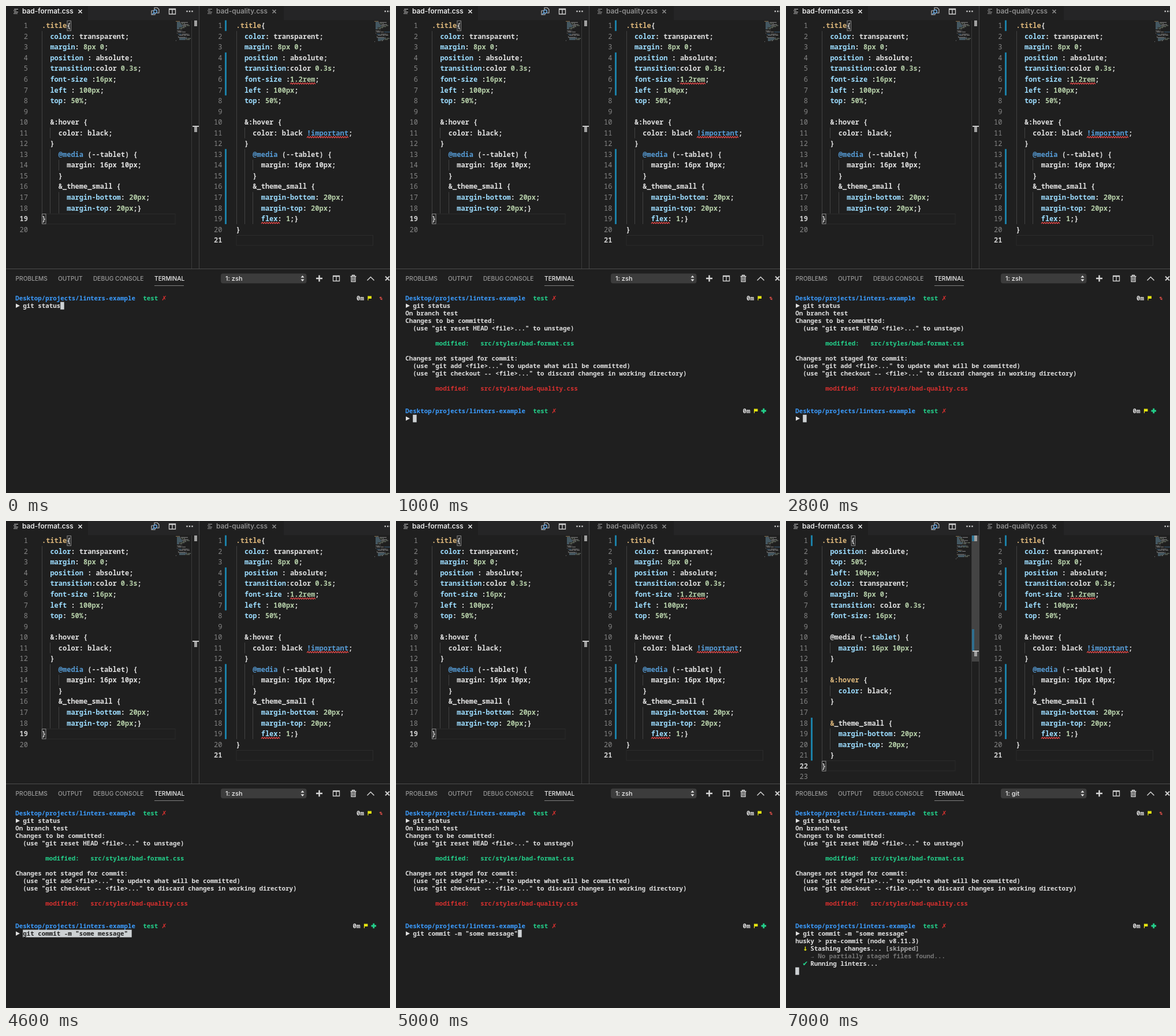
These frames come from a looping animation (665 px wide and 842 px high, 8 s). An HTML page:

```html
<!DOCTYPE html>
<html lang="en">
<head>
<meta charset="utf-8">
<title>Linters in the editor</title>
<style>
  html, body { margin: 0; width: 100%; height: 100%; overflow: hidden; background: #1f1f1f; }
  svg { display: block; }
  text { white-space: pre; }
  .code { font: 600 12px "Noto Sans Mono", "DejaVu Sans Mono", monospace; }
  .term { font: 600 10.83px "Noto Sans Mono", "DejaVu Sans Mono", monospace; }
  .num { font-weight: 500; }
  .bold { font-weight: 700; }
  .sign { font: 700 13.5px "DejaVu Sans Mono", "DejaVu Sans", monospace; }
  .ui { font-family: Inter, Roboto, sans-serif; font-weight: 500; }
</style>
</head>
<body>
<svg id="stage" width="665" height="842" viewBox="0 0 665 842"></svg>
<script>
const LOOP = 8000;
const COLORS = {
  w: '#e0e0e0', y: '#dcb67a', b: '#9cdcfe', g: '#b5cea8', k: '#569cd6',
  d: '#747474', r: '#d6302f', n: '#23d18b', p: '#3b9cff', u: '#e5e510', l: '#a8a8a8'
};

// Code: "~x" switches to colour x; declarations are highlighted automatically.
const head = ['  color: transparent;', '  margin: 8px 0;', '  position : absolute;', '  transition:color 0.3s;'];
const mid = ['  left : 100px;', '  top: 50%;', '', '~w  &:hover {'];
const nested = ['~w  }', '~k    @media ~w(--tablet) {', '~w      margin: 16px 10px;', '~w    }',
  '~w    &_theme_small {', '      margin-bottom: 20px;'];
const messy = ['~y.title~w{', ...head, '  font-size :16px;', ...mid, '~w    color: black;',
  ...nested, '      margin-top: 20px;}', '~w}', ''];
const quality = ['~y.title~w{', ...head, '  font-size :1.2rem;', ...mid, '~w    color: black ~k!important~w;',
  ...nested, '      margin-top: 20px;', '      flex: 1;}', '~w}', ''];
const tidy = ['~y.title ~w{', '  position: absolute;', '  top: 50%;', '  left: 100px;', '  color: transparent;',
  '  margin: 8px 0;', '  transition: color 0.3s;', '  font-size: 16px;', '', '~w  @media (--~btablet~w) {',
  '    margin: 16px 10px;', '~w  }', '', '~y  &:hover ~w{', '    color: black;', '~w  }', '',
  '~y  &~w_theme_small {', '    margin-bottom: 20px;', '    margin-top: 20px;', '~w  }', '~w}', ''];

const esc = s => s.replace(/&/g, '&amp;').replace(/</g, '&lt;');
const rect = (x, y, w, h, fill, more = '') =>
  `<rect x="${x}" y="${y}" width="${w}" height="${h}" fill="${fill}" ${more}/>`;
const path = (d, color, width = 1, fill = 'none') =>
  `<path d="${d}" stroke="${color}" stroke-width="${width}" fill="${fill}"/>`;
const label = (x, y, s, size, color) =>
  `<text class="ui" x="${x}" y="${y}" font-size="${size}" fill="${color}">${esc(s)}</text>`;
const during = (from, to, body) => `<g data-from="${from}" data-to="${to}">${body}</g>`;

function tokens(line) {
  const decl = /^( *[\w-]+)( ?:)(.*)$/.exec(line);
  if (!line.includes('~') && decl) {
    line = `~b${decl[1]}~w${decl[2]}` + decl[3].replace(/[\d.]+(px|rem|s|%)?/g, '~g$&~w');
  }
  let col = 0;
  return line.split('~').slice(1).map(part => {
    const token = { color: COLORS[part[0]], col, s: part.slice(1) };
    col += token.s.length;
    return token;
  });
}

function textLine(line, x, y, cell, cls) {
  return tokens(line).map(t => {
    const pad = t.s.length - t.s.trimStart().length, s = t.s.trim();
    const style = /^[✗↓❯✔]$/.test(s) ? 'sign' : cls;
    return `<text class="${style}" x="${x + (t.col + pad) * cell}" y="${y}" fill="${t.color}">${esc(s)}</text>`;
  }).join('');
}

// Editor
const CELL = 7.2, ROW = 18.55;
const rowTop = n => 24.7 + (n - 1) * ROW;

function minimap(lines, x) {
  return lines.map((line, i) => tokens(line).map(t =>
    [...t.s.matchAll(/[^\s]+/g)].map(m =>
      rect(x + t.col + m.index, 26 + i * 1.85, m[0].length, 1, t.color, 'opacity=".55"')
    ).join('')).join('')).join('');
}

function squiggle(x, row, chars) {
  let d = `M${x} ${rowTop(row) + 17.8}`;
  for (let i = 0; i < chars * CELL / 4; i++) d += 'l2 -2.500l2 2.500';
  return path(d, '#f14c4c', 1.2);
}

// guides: [column, first row, last row]; changed: [first row, last row]
function editor(x, lines, { current, width, guides, changed, mapX }) {
  let out = rect(x + .5, Math.round(rowTop(current)) + .5, width, 17.5, 'none', 'stroke="#2b2b2b"');
  for (const [col, a, b] of guides) {
    out += rect(Math.round(x + col * CELL), rowTop(a), 1, (b - a + 1) * ROW, '#424242');
  }
  for (const [a, b] of changed) out += rect(Math.round(x - 19.5), rowTop(a), 3, (b - a + 1) * ROW, '#1b81a8');
  lines.forEach((line, i) => {
    const y = 38.2 + i * ROW, on = i + 1 === current;
    out += `<text class="code ${on ? 'bold' : 'num'}" x="${x - 24}" y="${y}" text-anchor="end" fill="${on ? '#d0d0d0' : '#858585'}">${i + 1}</text>`;
    out += textLine(line, x, y, CELL, 'code');
  });
  return out + minimap(lines, mapX);
}

const bracket = (x, row) =>
  rect(x + .5, rowTop(row) + 1, 6.5, 17, 'none', 'stroke="#909090"');

const looseGuides = last => [[0, 2, last], [2, 11, 11], [2, 13, last], [4, 14, 14], [4, 17, last]];
const leftMessy = editor(62, messy, {
  current: 19, width: 230.5, guides: looseGuides(18), changed: [], mapX: 294
}) + bracket(105.5, 1) + bracket(62, 19)
  + rect(326, 25, 5, 10, '#a0a0a0') + rect(323, 207, 11, 2, '#c8c8c8') + rect(326, 209, 5, 9, '#a0a0a0');

const leftTidy = rect(322, 25, 13, 218, '#444444')
  + editor(62, tidy, {
    current: 22, width: 230.5, guides: [[0, 2, 21], [2, 11, 11], [2, 15, 15], [2, 19, 20]],
    changed: [[1, 1], [18, 21]], mapX: 294
  }) + bracket(112.7, 1) + bracket(62, 22)
  + rect(322, 25, 4, 10, '#2f7797') + rect(322, 187, 4, 37, '#2f6f90') + rect(326, 25, 5, 10, '#a0a0a0')
  + rect(323, 224, 11, 2, '#c8c8c8') + rect(326, 226, 5, 8, '#a0a0a0');

const right = editor(398.5, quality, {
  current: 21, width: 236.5, guides: looseGuides(19), changed: [[1, 1], [4, 7], [13, 19]], mapX: 638
}) + squiggle(492, 6, 6) + squiggle(521, 11, 10) + squiggle(442, 19, 4);

// Tabs and icons
const fileIcon = (x, c) => path(`M${x + 1} 5.5h7M${x} 8h5M${x + 1} 10.5h7M${x} 13h7`, c, 1);
const cross = (x, y, r, c, w) => path(`M${x - r} ${y - r}l${2 * r} ${2 * r}m0 ${-2 * r}l${-2 * r} ${2 * r}`, c, w);
const dots = (x, y) => [0, 4.5, 9].map(d => rect(x + d, y, 2.4, 2.4, '#c5c5c5')).join('');
const split = (x, y) => path(`M${x} ${y}h11v9h-11zM${x + 5.5} ${y}v9M${x} ${y + 1}h11`, '#d0d0d0', 1.3);

const tabs = rect(0, 0, 665, 24.5, '#252526') + rect(0, 0, 142, 25, '#1f1f1f') + rect(336, 0, 145, 25, '#1f1f1f')
  + fileIcon(13, '#c5c5c5') + label(28, 13.3, 'bad-format.css', 12, '#ffffff') + cross(128.5, 9.5, 3, '#e8e8e8', 1.6)
  + fileIcon(349, '#a0a0a0') + label(364, 13.3, 'bad-quality.css', 12, '#9b9b9b') + cross(464.5, 9.5, 3, '#909090', 1.5)
  + path('M257 7v-4h5l3 3v6h-4', '#c5c5c5', 1.1) + path('M252 8h4m-4 0v7h6v-2', '#c5c5c5', 1.1)
  + '<circle cx="258.500" cy="9.500" r="2.800" fill="none" stroke="#75beff" stroke-width="1.2"/>'
  + path('M256.500 11.500l-3 3', '#75beff', 1.3)
  + split(282.5, 5) + dots(312.3, 8) + dots(655.5, 8);

const frame = rect(321, 25, 1, 429, '#3a3a3a') + rect(334, 0, 1, 454, '#444444');

const panel = rect(0, 454, 665, 1, '#4c4c4c')
  + [[16.5, 'PROBLEMS'], [90, 'OUTPUT'], [151, 'DEBUG CONSOLE'], [257, 'TERMINAL']].map(([x, s], i) =>
    label(x, 475, s, 10.2, i === 3 ? '#eeeeee' : '#9a9a9a')).join('')
  + rect(257, 483, 51, 1, '#808080')
  + rect(372, 462.5, 148.5, 17, '#3c3c3c', 'rx="4"')
  + path('M510.500 469.500l3 -3.500l3 3.500zM510.500 472.500l3 3.500l3 -3.500z', 'none', 0, '#e8e8e8')
  + during(0, 6000, label(380, 475, '1: zsh', 11, '#f0f0f0'))
  + during(6000, LOOP, label(380, 475, '1: git', 11, '#f0f0f0'))
  + path('M537 471h11M542.500 465.500v11', '#d8d8d8', 2.4)
  + split(566.5, 466.5)
  + path('M596.500 467.500h10M599.500 467v-1.500h4v1.500M598 468v8.500h7v-8.500M600.300 469v6M602.700 469v6', '#d8d8d8', 1.3)
  + path('M625.500 474.500l6 -6l6 6', '#d0d0d0', 1.5) + cross(660.5, 471, 3.5, '#d0d0d0', 1.9);

// Terminal
const TCELL = 6.5, TROW = 13;
const say = (row, line, cls = 'term', x = 16.2) => textLine(line, x, 509 + row * TROW, TCELL, cls);
const cursor = (row, col, cells = 1) =>
  rect(16.2 + col * TCELL, 498.7 + row * TROW, cells * TCELL, TROW, '#cdd1d3');

function prompt(row, x) {
  const y = 505 + row * TROW;
  return say(row, '~pDesktop/projects/linters-example', 'term bold') + say(row, `~n${' '.repeat(34)}test`)
    + say(row, `~r${' '.repeat(39)}✗`)
    + say(row, '~w0m', 'term bold', x)
    + path(`M${x + 20} ${y - 3.5}v7.5`, COLORS.u, 1.2) + rect(x + 20, y - 3.5, 6, 4.5, COLORS.u)
    + path(`M17 ${y + 9.5}l7 3.800l-7 3.800z`, 'none', 0, COLORS.w);
}

const command = 'git commit -m "some message"';
const first = prompt(0, 607) + say(1, '~w  git status')
  + path('M646.500 503.500l3 -1l2 3v3l-3 -1z', 'none', 0, '#c94a44') + path('M647 506l4 -1', '#1f1f1f', .7);

const status = ['~wOn branch test', '~wChanges to be committed:', '~w  (use "git reset HEAD <file>..." to unstage)', '',
  '~n        modified:   src/styles/bad-format.css', '', '~wChanges not staged for commit:',
  '~w  (use "git add <file>..." to update what will be committed)',
  '~w  (use "git checkout -- <file>..." to discard changes in working directory)', '',
  '~r        modified:   src/styles/bad-quality.css'].map((s, i) => say(i + 2, s)).join('')
  + prompt(15, 600.5) + path('M632.500 700h8.500M636.750 695.750v8.500', COLORS.n, 2.8);

const hook = ['~whusky > pre-commit (node v8.11.3)', '~u  ↓~w Stashing changes... ~l[skipped]',
  '~d    → No partially staged files found...'].map((s, i) => say(i + 17, s)).join('');
const running = ['~u  ❯~w Running linters...', '~u    ❯~w Running tasks for *.css', '~w        prettier --write',
  '~w        stylelint --fix --config ./.stylelintrc-format', '~w        git add'].map((s, i) => say(i + 20, s)).join('')
  + [787.5, 790.5, 793.5].map(y => rect(60, y - .8, 2, 1.7, COLORS.u)).join('');
const done = say(20, '~n  ✔~w Running linters...') + cursor(21, 0);

const terminal = first
  + during(0, 1000, cursor(1, 12))
  + during(1000, LOOP, status)
  + during(1000, 4000, cursor(16, 2))
  + during(4000, 5000, cursor(16, 2, 29)
    + `<text class="term" x="29.2" y="717" fill="#1f1f1f">${command}</text>`)
  + during(5000, LOOP, say(16, '~w  ' + command))
  + during(5000, 6000, cursor(16, 30))
  + during(6000, LOOP, hook)
  + during(6000, 7000, running)
  + during(7000, LOOP, done);

const stage = document.getElementById('stage');
stage.innerHTML = rect(0, 0, 665, 842, '#1f1f1f') + tabs + frame
  + during(0, 7000, leftMessy) + during(7000, LOOP, leftTidy) + right + panel + terminal;

const timed = [...stage.querySelectorAll('[data-from]')].map(el => ({ el, from: +el.dataset.from, to: +el.dataset.to }));
function draw() {
  const t = performance.now() % LOOP;
  for (const { el, from, to } of timed) el.style.display = t >= from && t < to ? '' : 'none';
  requestAnimationFrame(draw);
}
draw();
</script>
</body>
</html>
```
